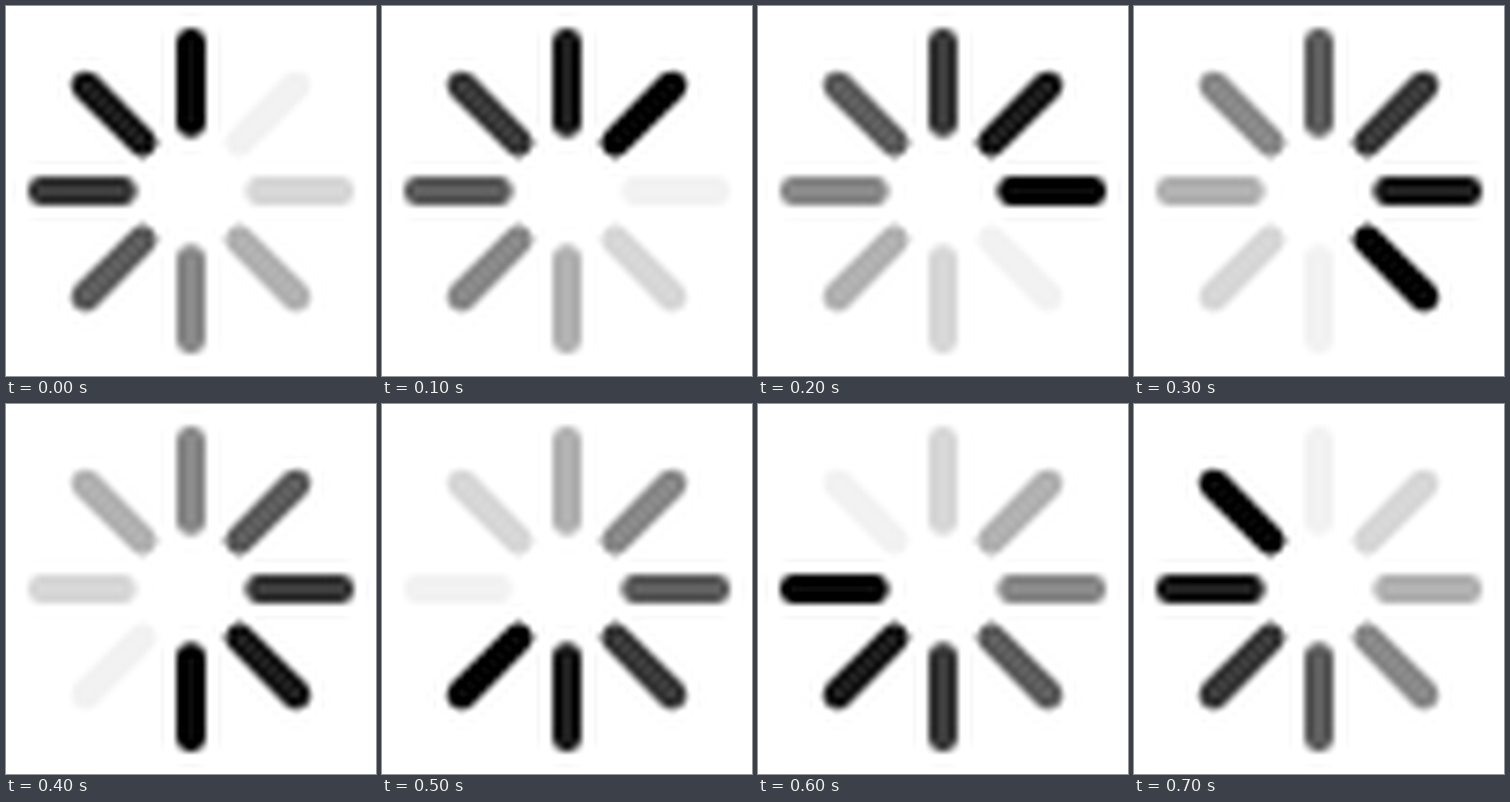
Recreate the animation shown at these times as an HTML page with a canvas. Size 450 by 450 pixels, loop 800 ms.

```html
<!DOCTYPE html>
<html lang="en">
<head>
<meta charset="utf-8">
<title>Spinner</title>
<style>
  html, body { margin: 0; height: 100%; overflow: hidden; background: #fff; }
  canvas { display: block; width: 100%; height: 100%; }
</style>
</head>
<body>
<canvas id="stage" width="450" height="450"></canvas>
<script>
  // The spinner is a 50 px icon, enlarged nine times with a Lanczos filter.
  const ICON = 50, SIZE = 450, SCALE = SIZE / ICON, LOBES = 3;
  const STEP = 100;
  // Grey level by the number of steps since a spoke was the darkest one
  const greys = [0, 25, 56, 92, 136, 177, 215, 242];
  const count = greys.length;

  const stage = document.getElementById('stage').getContext('2d');
  const iconCanvas = document.createElement('canvas');
  iconCanvas.width = iconCanvas.height = ICON;
  const icon = iconCanvas.getContext('2d', { willReadFrequently: true });

  function drawIcon(head) {
    icon.fillStyle = '#fff';
    icon.fillRect(0, 0, ICON, ICON);
    icon.lineWidth = 4;
    icon.lineCap = 'round';
    for (let i = 0; i < count; i++) {
      const grey = greys[(head - i + count) % count];
      icon.strokeStyle = `rgb(${grey}, ${grey}, ${grey})`;
      icon.save();
      icon.translate(ICON / 2, ICON / 2);
      icon.rotate(i * 2 * Math.PI / count);
      icon.beginPath();
      icon.moveTo(0, -9.3);
      icon.lineTo(0, -20.1);
      icon.stroke();
      icon.restore();
    }
    const { data } = icon.getImageData(0, 0, ICON, ICON);
    return data.filter((_, i) => i % 4 === 0);
  }

  const sinc = x => x ? Math.sin(Math.PI * x) / (Math.PI * x) : 1;
  const lanczos = x => Math.abs(x) < LOBES ? sinc(x) * sinc(x / LOBES) : 0;

  // For each enlarged pixel: the icon pixels it blends and their weights
  const taps = Array.from({ length: SIZE }, (_, i) => {
    const pos = (i + 0.5) / SCALE - 0.5;
    const first = Math.floor(pos) - LOBES + 1;
    const list = [];
    for (let p = first; p < first + 2 * LOBES; p++) {
      if (p >= 0 && p < ICON) list.push([p, lanczos(pos - p)]);
    }
    const total = list.reduce((sum, [, w]) => sum + w, 0);
    return list.map(([p, w]) => [p, w / total]);
  });

  // Widens each row to SIZE and transposes, so two passes enlarge both ways
  function widen(src, rows) {
    const out = new Uint8ClampedArray(SIZE * rows);
    for (let y = 0; y < rows; y++) {
      for (let x = 0; x < SIZE; x++) {
        let sum = 0;
        for (const [p, w] of taps[x]) sum += src[y * ICON + p] * w;
        out[x * rows + y] = sum;
      }
    }
    return out;
  }

  const frames = greys.map((_, head) => {
    const pixels = widen(widen(drawIcon(head), ICON), SIZE);
    const image = new ImageData(SIZE, SIZE);
    pixels.forEach((grey, i) => {
      image.data.fill(grey, i * 4, i * 4 + 3);
      image.data[i * 4 + 3] = 255;
    });
    return image;
  });

  const draw = ms => stage.putImageData(frames[Math.floor(ms / STEP) % count], 0, 0);

  let start;
  function tick(now) {
    start ??= now;
    draw(now - start);
    requestAnimationFrame(tick);
  }

  draw(0);
  requestAnimationFrame(tick);
</script>
</body>
</html>
```
